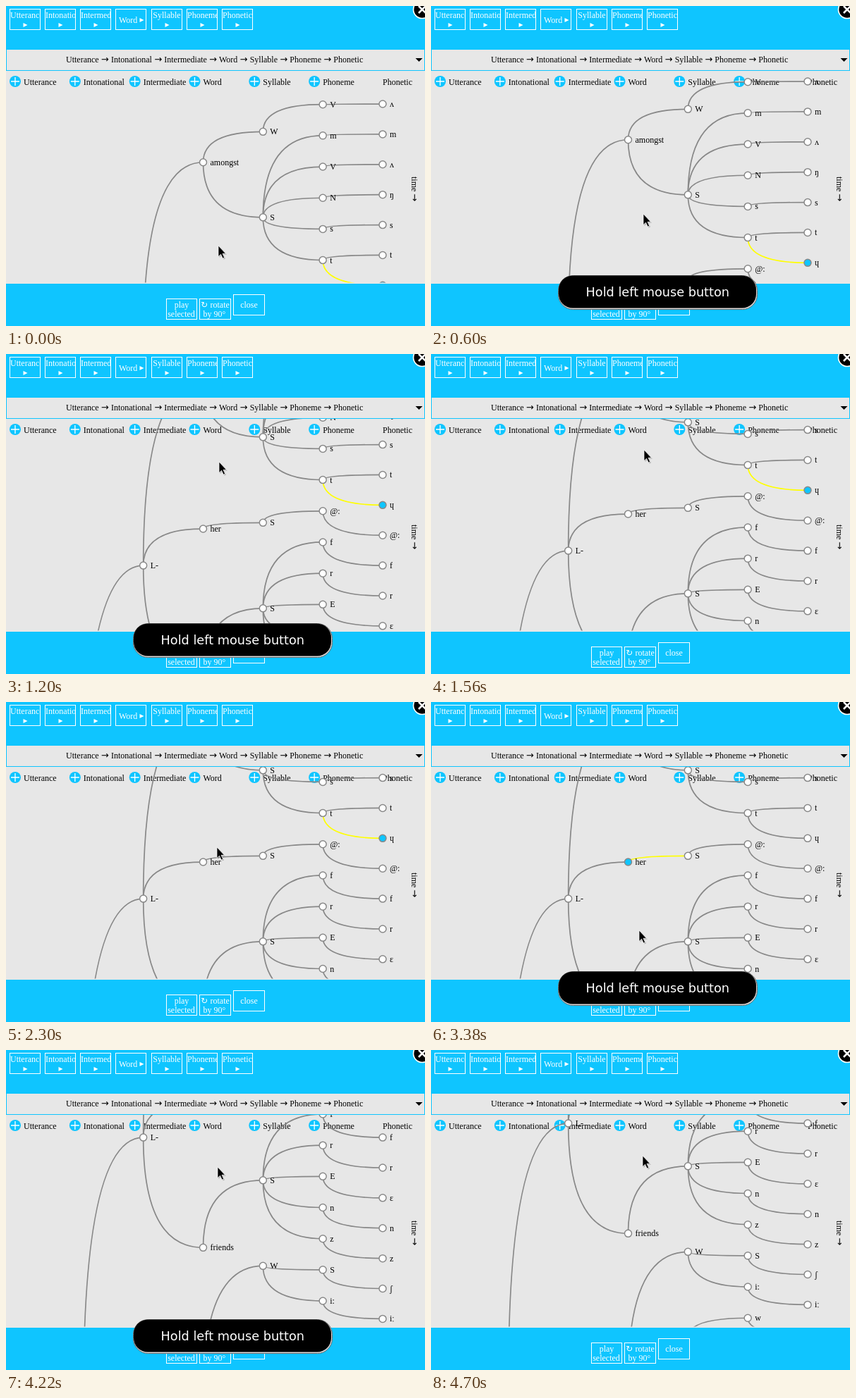
These frames come from a looping animation (594 by 454 pixels, 5.3 s). An HTML page:

```html
<!DOCTYPE html>
<html lang="en">
<head>
<meta charset="utf-8">
<title>Annotation tree</title>
<style>
  html, body { margin: 0; width: 100%; height: 100%; overflow: hidden; background: #0fc5ff; }
  svg { display: block; width: 100vw; height: 100vh; }
  text { font: 12px "Liberation Serif", "DejaVu Sans", serif; white-space: pre; }
  .arrow { font: 13px "DejaVu Sans", sans-serif; }
  .light { fill: #fff; }
  .box { fill: none; stroke: #fff; }
  .edge { fill: none; stroke: #888; stroke-width: 1.7; }
  .node { fill: #fff; stroke: #888; stroke-width: 1.5; }
  .edge.on { stroke: #ff0; }
  .node.on { fill: #0fc5ff; }
  #tip text { font: 17.7px "DejaVu Sans", sans-serif; fill: #fff; }
</style>
</head>
<body>
<svg viewBox="0 0 594 454">
  <defs>
    <clipPath id="view"><rect y="92" width="594" height="300.5"/></clipPath>
    <path id="arrowhead" d="M0 0V15.5L3.6 12.2 6.2 18 8.6 17 6 11.3H10.5Z"/>
  </defs>
  <rect width="594" height="454" fill="#0fc5ff"/>
  <rect y="61" width="594" height="333" fill="#e7e7e7"/>
  <rect x=".5" y="61.5" width="593" height="30" fill="#e7e7e7" stroke="#0fc5ff"/>
  <text id="path" x="85" y="80" word-spacing=".2"></text>
  <path d="M580.5 74h10l-5 5z"/>
  <g id="buttons"></g>
  <g id="heads"></g>
  <text transform="translate(574.5 242) rotate(90)">time <tspan class="arrow">→</tspan></text>
  <g clip-path="url(#view)"><g id="tree"></g></g>
  <circle cx="590" cy="5" r="12.5" stroke="#fff" stroke-width="1.6"/>
  <path d="M585 0l10 10M595 0l-10 10" stroke="#fff" stroke-width="2.6"/>
  <g id="tip">
    <rect x="180.5" y="382.5" width="282" height="48" rx="21" fill="#ddd" stroke="#666"/>
    <rect x="181" y="382.5" width="280" height="46" rx="20"/>
    <text x="321.3" y="412" text-anchor="middle">Hold left mouse button</text>
  </g>
  <g id="cursor">
    <use href="#arrowhead" x="1.5" y="1.5" opacity=".2"/>
    <use href="#arrowhead" stroke="#fff" stroke-width=".7"/>
  </g>
</svg>
<script>
const $ = id => document.getElementById(id);
const LOOP = 5300, STEP = 120;
const tiers = ["Utterance", "Intonational", "Intermediate", "Word", "Syllable", "Phoneme", "Phonetic"];
const colX = c => 25 + 84.83 * c;
const text = (s, x, y, extra = "") => `<text x="${x}" y="${y}" ${extra}>${s}</text>`;
const box = (x, y, w = 43) => `<rect class="box" x="${x + .5}" y="${y + .5}" width="${w}" height="29"/>`;
const light = 'class="light"', mid = light + ' text-anchor="middle"';

// Toolbar, bottom buttons and column heads
const play = (x, y) => `<path class="light" d="M${x - 2.5} ${y - 3}l6 3-6 3z"/>`;
function tierButton(name, i) {
  const x = Math.round(5 + 50.15 * i);
  if (name === "Word") return box(x, 4) + text(name, x + 5, 24, light) + play(x + 37, 20);
  const fits = name[0] === "S" || name === "Phonetic";
  const label = fits ? text(name, x + 22, 17, mid) : text(name, x + 1, 17, light);
  return `<clipPath id="b${i}"><rect x="${x}" y="4" width="44" height="30"/></clipPath>` +
    box(x, 4) + `<g clip-path="url(#b${i})">${label}</g>` + play(x + 22, 27);
}
$("path").innerHTML = tiers.join(' <tspan class="arrow">→</tspan> ');
$("buttons").innerHTML = tiers.map(tierButton).join("") +
  box(227, 415) + text("play", 249, 428, mid) + text("selected", 248.5, 441, mid) +
  box(274, 415, 44) + text("↻", 276, 428, light) + text("rotate", 289.5, 428, light) +
  text("by 90°", 295.5, 441, mid) +
  box(322, 409, 44) + text("close", 344.5, 428, mid);
$("heads").innerHTML = tiers.map((name, i) => {
  const x = colX(i);
  const plus = `<circle cx="${x - 12}" cy="107" r="8" fill="#0fc5ff"/>
    <path d="M${x - 18} 107h12m-6-6v12" stroke="#fff" stroke-width="1.3"/>`;
  return (i < tiers.length - 1 ? plus : "") + text(name, x, 112);
}).join("");

// Tree: [label, children]; strings hold a phoneme and its phones
const tree = ["", [
  ["L-", [
    ["amongst", [["W", ["V ʌ"]], ["S", ["m m", "V ʌ", "N ŋ", "s s", "t t ɥ"]]]],
    ["her", [["S", ["@: @:"]]]],
    ["friends", [["S", ["f f", "r r", "E ɛ", "n n", "z z"]]]]
  ]],
  ["", [["", [["W", ["S ʃ", "i: iː"]], ["", ["w w"]]]]]]
]];
// Every tier shares its height evenly among all its items, shown or not
const TOP = 117.6, HEIGHT = 1458;
const counts = [1, 1, 2, 7, 12, 33, 34], used = counts.map(() => 0);
let edges = "", nodes = "";
function grow(item, col, parent) {
  if (typeof item === "string") {
    const [name, ...phones] = item.split(" ");
    item = [name, phones.map(p => [p, []])];
  }
  const [label, kids] = item, x = colX(col);
  const y = TOP + HEIGHT / counts[col] * (used[col]++ + .5);
  if (parent) {
    const mark = label === "ɥ" ? "first" : parent.label === "her" ? "second" : "";
    edges += `<path class="edge ${mark}" d="M${parent.x} ${parent.y}Q${parent.x} ${y} ${x} ${y}"/>`;
  }
  const key = label === "ɥ" ? "first" : label === "her" ? "second" : "";
  nodes += `<circle class="node ${key}" cx="${x}" cy="${y}" r="5"/>` + text(label, x + 10, y + 4);
  kids.forEach(k => grow(k, col + 1, { x, y, label }));
}
grow(tree, 1);
$("tree").innerHTML = edges + nodes;
const first = document.querySelectorAll(".first"), second = document.querySelectorAll(".second");

// Pointer strokes; a drag also scrolls, trailing the pointer a little
const strokes = [
  { from: 360, to: 1440, dx: 1, dy: -204, ease: 1.4, scroll: 203, trail: 1.72 },
  { from: 1940, to: 2720, dx: -7, dy: 188, ease: 2.4, scroll: 0, trail: 1 },
  { from: 3380, to: 4580, dx: 5, dy: -174, ease: .86, scroll: 175, trail: 1.04 }
];
const inside = (t, a, b) => t >= a && t < b;

function draw(t) {
  // The picture advances in fixed steps
  const shift = t < 2060 ? 0 : 20;
  const s = Math.floor((t - shift) / STEP) * STEP + shift;
  let x = 301, y = 340, scroll = 0;
  for (const k of strokes) {
    const u = Math.min(1, Math.max(0, (s - k.from) / (k.to - k.from)));
    const swing = Math.sin(u * Math.PI / 2), part = swing ** k.ease;
    x += k.dx * part;
    y += k.dy * part;
    scroll += k.scroll * swing ** k.trail;
  }
  $("cursor").setAttribute("transform", `translate(${Math.round(x)} ${Math.round(y)})`);
  $("tree").setAttribute("transform", `translate(0 ${-Math.round(scroll)})`);
  const held = inside(t, 360, 1560) || inside(t, 3380, 4700);
  $("tip").setAttribute("visibility", held ? "visible" : "hidden");
  first.forEach(e => e.classList.toggle("on", t < 2420));
  second.forEach(e => e.classList.toggle("on", t >= 2420));
}
const start = performance.now();
function tick() {
  draw((performance.now() - start) % LOOP);
  requestAnimationFrame(tick);
}
tick();
</script>
</body>
</html>
```
